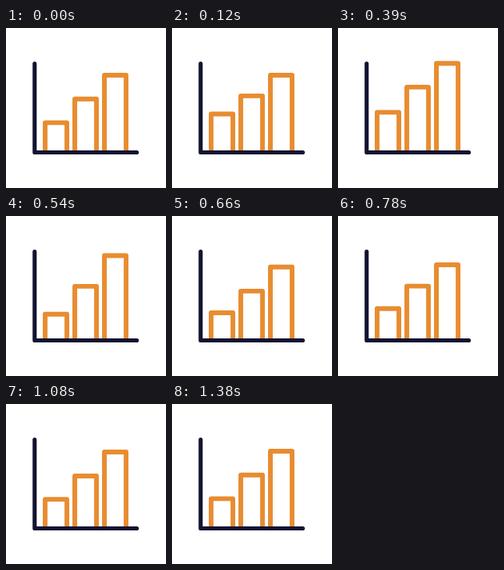
Animation of 200 by 200 pixels, one loop 3.44 s. Source, as an HTML page with a canvas:

```html
<!DOCTYPE html>
<html lang="en">
<head>
<meta charset="utf-8">
<title>Bar chart</title>
<style>
html, body { margin: 0; width: 100%; height: 100%; overflow: hidden; background: #fff; }
canvas { display: block; width: 200px; height: 200px; }
</style>
</head>
<body>
<canvas id="stage" width="200" height="200"></canvas>
<script>
const ctx = document.getElementById('stage').getContext('2d');
const LOOP = 3440, STEP = 30, REST = 1380;
const LIFT = 14.8, BOUNCE = 7.6, DECAY = 0.0033, FREQ = 0.0146;
const NAVY = '#121331', ORANGE = '#e88c30';
const bars = [
  { left: 48.9, right: 76.1, top: 118.4 },
  { left: 86, right: 113.1, top: 88.7 },
  { left: 123, right: 150.1, top: 59 }
];

const clamp = v => Math.max(0, Math.min(1, v));
const smooth = p => p * p * (3 - 2 * p);

// Rise, hold, drop, then a damped bounce; each bar trails the one before.
function shift(t, i) {
  if (t >= REST) return 0;
  const land = 488 + 56 * i;
  if (t < land) {
    const up = smooth(clamp((t - 60 * i) / 180));
    const down = clamp((t - land + 150) / 150) ** 2;
    return -LIFT * up * (1 - down);
  }
  const dt = t - land;
  return BOUNCE * Math.sin(FREQ * dt) * Math.exp(-DECAY * dt);
}

function line(points, color, width) {
  ctx.strokeStyle = color;
  ctx.lineWidth = width;
  ctx.beginPath();
  points.forEach(([x, y]) => ctx.lineTo(x, y));
  ctx.stroke();
}

function draw(t) {
  ctx.clearRect(0, 0, 200, 200);
  ctx.lineCap = ctx.lineJoin = 'round';
  bars.forEach((b, i) => {
    const y = b.top + shift(t, i);
    line([[b.left, 154], [b.left, y], [b.right, y], [b.right, 154]], ORANGE, 5.9);
  });
  line([[35.8, 44.5], [35.8, 155.5], [163.5, 155.5]], NAVY, 5.1);
}

const start = performance.now();
function tick() {
  const t = (performance.now() - start) % LOOP;
  draw(Math.floor(t / STEP) * STEP);
  requestAnimationFrame(tick);
}
tick();
</script>
</body>
</html>
```
